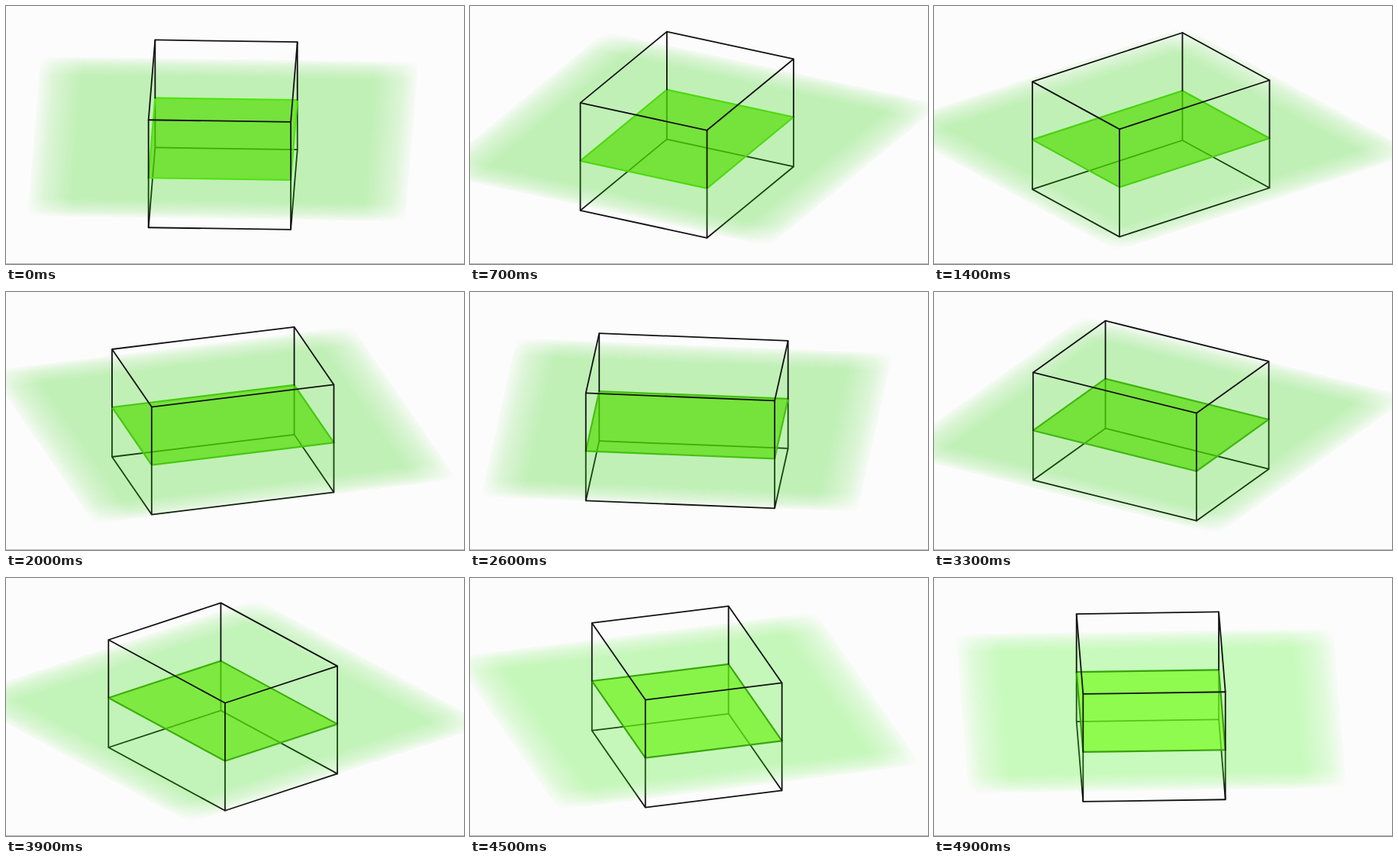
Recreate the animation shown at these times as an HTML page without scripts. Size 600 by 338 pixels, loop 5 s.

```html
<!DOCTYPE html>
<html lang="en">
<head>
<meta charset="utf-8">
<title>Plane through a box</title>
<style>
  @property --a { syntax: "<angle>"; inherits: true; initial-value: 2deg; }

  html, body { margin: 0; width: 100%; height: 100%; overflow: hidden; background: #fdfcfd; }
  svg { display: block; width: 100vw; height: 100vh; }

  .scene, .glow, .shade, .rim { animation: 5s steps(50) -5ms infinite; }
  .glow  { animation-name: glow; }
  .shade { animation-name: shade; }
  .rim   { animation-name: rim; }

  /* u and v: half sides of the turning base, flattened by the tilt k */
  .scene {
    animation-name: turn;
    --k: .422;
    --ux: calc(93.25 * cos(var(--a)));
    --uy: calc(93.25 * var(--k) * sin(var(--a)));
    --vx: calc(-124.25 * sin(var(--a)));
    --vy: calc(124.25 * var(--k) * cos(var(--a)));
  }
  .flat { transform: scale(1, var(--k)) rotate(var(--a)); }

  .edge {
    transform:
      translate(calc(var(--n) * var(--px) * 1px), calc(var(--n) * var(--py) * 1px))
      rotate(atan2(var(--dy), var(--dx)))
      scaleX(hypot(var(--dx), var(--dy)));
  }
  .u { --dx: var(--ux); --dy: var(--uy); --px: var(--vx); --py: var(--vy); }
  .v { --dx: var(--vx); --dy: var(--vy); --px: var(--ux); --py: var(--uy); }

  .post {
    d: var(--d);
    stroke-linecap: round;
    transform: translate(
      calc((var(--n) * var(--ux) + var(--m) * var(--vx)) * 1px),
      calc((var(--n) * var(--uy) + var(--m) * var(--vy)) * 1px));
  }
  .lower { --d: path("M0 0V-65"); }
  .upper { --d: path("M0 0V-76"); }

  .wire { fill: none; stroke: #111; stroke-width: 1.8; }
  .rim { fill: none; stroke-width: 2.2; }

  @keyframes turn {
    from { --a: 2deg; }
    to   { --a: 181.6deg; }
  }
  @keyframes glow {
    0%, 68% { fill: rgb(37, 208, 0); animation-timing-function: steps(16); }
    100%    { fill: rgb(64, 246, 24); }
  }
  @keyframes shade {
    0%, 68% { fill: rgb(82, 219, 0); animation-timing-function: steps(16); }
    100%    { fill: rgb(117, 255, 26); }
  }
  @keyframes rim {
    from { stroke: rgb(80, 228, 16); }
    to   { stroke: rgb(56, 160, 14); }
  }
</style>
</head>
<body>
<svg class="scene" viewBox="0 0 600 338" preserveAspectRatio="none">
  <defs>
    <linearGradient id="fadeX">
      <stop offset="0" stop-color="#fff" stop-opacity=".1"/>
      <stop offset=".04" stop-color="#fff" stop-opacity=".55"/>
      <stop offset=".115" stop-color="#fff"/>
      <stop offset=".885" stop-color="#fff"/>
      <stop offset=".96" stop-color="#fff" stop-opacity=".55"/>
      <stop offset="1" stop-color="#fff" stop-opacity=".1"/>
    </linearGradient>
    <linearGradient id="fadeY" href="#fadeX" x2="0" y2="1"/>
    <rect id="sheet" x="-248" y="-248" width="496" height="496"/>
    <mask id="maskX" maskUnits="userSpaceOnUse" x="-248" y="-248" width="496" height="496">
      <use href="#sheet" fill="url(#fadeX)"/>
    </mask>
    <mask id="maskY" maskUnits="userSpaceOnUse" x="-248" y="-248" width="496" height="496">
      <use href="#sheet" fill="url(#fadeY)"/>
    </mask>
    <g id="base">
      <path class="edge u" style="--n: 1" d="M-1 0H1"/>
      <path class="edge u" style="--n: -1" d="M-1 0H1"/>
      <path class="edge v" style="--n: 1" d="M-1 0H1"/>
      <path class="edge v" style="--n: -1" d="M-1 0H1"/>
    </g>
    <g id="posts">
      <path class="post" style="--n: 1; --m: 1"/>
      <path class="post" style="--n: 1; --m: -1"/>
      <path class="post" style="--n: -1; --m: 1"/>
      <path class="post" style="--n: -1; --m: -1"/>
    </g>
  </defs>

  <rect width="600" height="338" fill="#fdfcfd"/>
  <rect y="337" width="600" height="1" fill="#b9b9b9"/>

  <!-- below the plane -->
  <g class="wire lower" transform="translate(284.2 239.2)">
    <use href="#base"/>
    <use href="#posts"/>
  </g>

  <!-- plane, cut and upper posts -->
  <g transform="translate(284.2 174.2)">
    <g class="flat">
      <g mask="url(#maskX)">
        <g mask="url(#maskY)">
          <use href="#sheet" class="glow" opacity=".28"/>
        </g>
      </g>
      <rect class="shade" x="-93.25" y="-124.25" width="186.5" height="248.5" opacity=".67"/>
    </g>
    <use href="#base" class="rim"/>
    <use href="#posts" class="wire upper"/>
  </g>

  <!-- lid -->
  <use href="#base" class="wire" transform="translate(284.2 98.2)"/>
</svg>
</body>
</html>
```
